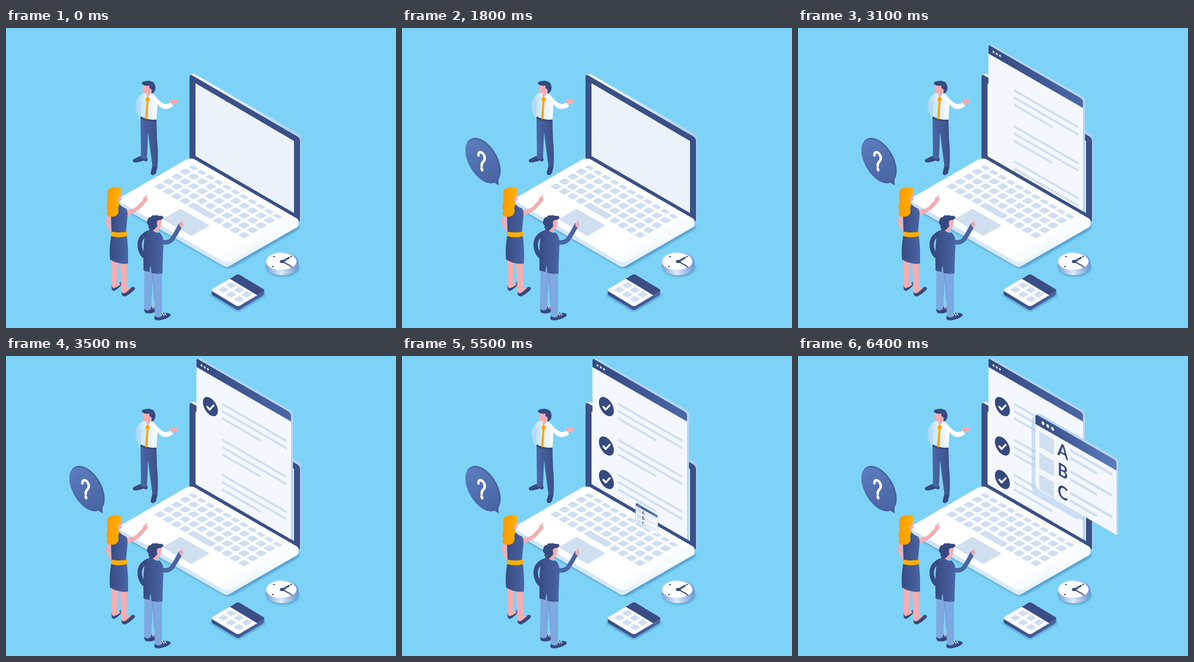
These frames come from a looping animation (780x600 px, 8 s). An HTML page:

```html
<!DOCTYPE html>
<html lang="en">
<head>
<meta charset="utf-8">
<title>Isometric presentation</title>
<style>
html, body { margin: 0; width: 100%; height: 100%; overflow: hidden; background: #7dd3f7; }
svg { display: block; width: 780px; height: 600px; }
.navy { fill: #374a80; }
.pale { fill: #d0dff0; }
.skin { fill: #f5adb2; }
.paper { fill: #f4f8fe; }
.edge { fill: #b5d5f5; }
.white { fill: #fff; }
.shade { fill: #2a6ca6; opacity: .45; filter: url(#blur); }
.line { fill: none; stroke-linecap: round; stroke-linejoin: round; }
.letter { font: 700 36px Lato, "Open Sans", sans-serif; text-anchor: middle; fill: #374a80; }
</style>
</head>
<body>
<svg viewBox="0 0 780 600">
  <defs>
    <filter id="blur" x="-20%" y="-20%" width="140%" height="140%"><feGaussianBlur stdDeviation="2"/></filter>
    <linearGradient id="bar"><stop offset="0" stop-color="#354980"/><stop offset="1" stop-color="#4b67a7"/></linearGradient>
    <linearGradient id="bar2"><stop offset="0" stop-color="#364a81"/><stop offset="1" stop-color="#5c7bbd"/></linearGradient>
    <linearGradient id="cloth"><stop offset="0" stop-color="#384b82"/><stop offset="1" stop-color="#4a65a5"/></linearGradient>
    <linearGradient id="slacks"><stop offset="0" stop-color="#4b68a8"/><stop offset="1" stop-color="#3c5189"/></linearGradient>
    <linearGradient id="shirt"><stop offset="0" stop-color="#a4d4f8"/><stop offset=".2" stop-color="#cde8fb"/><stop offset=".6" stop-color="#fff"/></linearGradient>
    <linearGradient id="hair"><stop offset="0" stop-color="#ff9800"/><stop offset="1" stop-color="#ffb300"/></linearGradient>
    <linearGradient id="side"><stop offset="0" stop-color="#cbe1f6"/><stop offset=".58" stop-color="#d9eafa"/><stop offset=".62" stop-color="#e3f0fb"/><stop offset="1" stop-color="#fff"/></linearGradient>
    <linearGradient id="deck"><stop offset=".85" stop-color="#fff"/><stop offset="1" stop-color="#f5fafd"/></linearGradient>
    <linearGradient id="lid"><stop offset="0" stop-color="#fff"/><stop offset="1" stop-color="#a9cdf0"/></linearGradient>
    <linearGradient id="rim"><stop offset="0" stop-color="#7c9fd6"/><stop offset=".45" stop-color="#dfebf9"/><stop offset="1" stop-color="#6c95d2"/></linearGradient>
    <linearGradient id="ring"><stop offset=".3" stop-color="#e6f0fb"/><stop offset="1" stop-color="#6f9ad6"/></linearGradient>
    <linearGradient id="talk" x1="0" y1="0" x2="1" y2="1"><stop offset="0" stop-color="#5f80c1"/><stop offset="1" stop-color="#46609f"/></linearGradient>
    <clipPath id="slot"><path d="M370-60H576V370L379 256L370 251Z"/></clipPath>
  </defs>
  <rect width="780" height="600" fill="#7dd3f7"/>

  <!-- laptop -->
  <path fill="url(#lid)" d="M369 96Q372 90 378 92.500L586 212Q590 214.500 590 221V384L586 388L369 262Z"/>
  <path fill="#3b5087" d="M367 99Q367 91.500 373 95L582 216.500Q588 220 588 227V384Q588 387 584 387L367 261Z"/>
  <path fill="#ebf2fa" d="M379 110.500L576 226V370L379 256Z"/>
  <g transform="matrix(.866 .5 -.866 .5 372 271)"><rect class="shade" width="255" height="171" rx="12"/></g>
  <path fill="url(#side)" d="M226 344L441 440L585 386V394Q585 396.500 581 399L447 476Q441 479.500 435 476L229 357Q226 355 226 352Z"/>
  <g transform="matrix(.866 .5 -.866 .5 369 258)">
    <rect width="255" height="171" rx="10" fill="url(#deck)"/>
    <g id="keys" class="pale"></g>
    <rect class="pale" x="92" y="115" width="67" height="42" rx="2"/>
  </g>

  <!-- page rising from the screen -->
  <g clip-path="url(#slot)">
    <g id="page">
      <path class="edge" d="M383 8Q384 3 389 5L569 108Q574 111 574 117V420L383 300Z"/>
      <path class="paper" d="M381 20L570 129V420L381 300Z"/>
      <path fill="url(#bar)" d="M381 9Q381 4 386 7.500L565 111Q570 114 570 119V131L381 22Z"/>
      <g id="pageDots" class="white"></g>
      <g id="rows" class="pale"></g>
    </g>
  </g>
  <g id="ticks"></g>

  <!-- pop-up card -->
  <g id="card">
    <path fill="#a3caef" opacity=".5" d="M467 129Q467 121 474 121L574 180V332L476 276Q467 270 467 261Z"/>
    <path class="edge" d="M477 120Q479 114 485 116.500L635 203Q641 206 641 213V354Q641 358 637 358Z"/>
    <path class="paper" d="M475 134L637 227V358L483 269Q475 264 475 256Z"/>
    <path fill="url(#bar2)" d="M475 122Q475 115 481 119.500L631 206Q637 209 637 216V229L475 136Z"/>
    <g id="cardDots" class="white"></g>
    <g id="items"></g>
  </g>

  <!-- clock -->
  <ellipse class="shade" cx="554" cy="479" rx="33" ry="18"/>
  <path fill="url(#rim)" d="M520 467V476A32.500 18.500 0 0 0 585 476V467Z"/>
  <ellipse cx="552.500" cy="467" rx="32.500" ry="18.500" fill="url(#ring)"/>
  <ellipse class="white" cx="551.500" cy="467" rx="29.500" ry="16.500"/>
  <g class="navy">
    <ellipse cx="536" cy="457" rx="2" ry="1.300"/><ellipse cx="570" cy="457" rx="2" ry="1.300"/>
    <ellipse cx="534" cy="477" rx="2" ry="1.300"/><ellipse cx="571" cy="478" rx="2" ry="1.300"/>
    <ellipse cx="552.500" cy="467" rx="5" ry="3.300"/>
  </g>
  <path class="line" stroke="#374a80" stroke-width="3.500" d="M553 467L566 459.500"/>
  <path class="line" stroke="#374a80" stroke-width="2.300" d="M553 467L569 476"/>

  <!-- calendar -->
  <g transform="matrix(.866 .52 -.866 .52 464 500)"><rect class="shade" width="66" height="66" rx="6"/></g>
  <path fill="url(#cloth)" d="M411.500 524L464 510L516.500 524V531Q516.500 533 514 534.500L467 563Q464 565 461 563L414 534.500Q411.500 533 411.500 531Z"/>
  <g transform="matrix(.866 .52 -.866 .52 464 491.500)">
    <rect class="white" width="63.500" height="63.500" rx="5"/>
    <path fill="#3a4e85" d="M0 19V5Q0 0 5 0H58.500Q63.500 0 63.500 5V19Z"/>
    <g id="days" class="pale"></g>
  </g>

  <!-- presenter -->
  <g>
    <path class="navy" d="M254 263Q264 258 271 255L282 258Q285 266 280 267L275 265Q266 269 256 269Q253 268 254 263Z"/>
    <path class="navy" d="M293 275Q298 278 303 277L300 290Q297 295 292 294Q288 292 290 287Z"/>
    <path fill="url(#slacks)" d="M269 178L270 260Q276 264 282 261L284 208L287 232L293 277Q298 280 303 277Q305 250 302 222L301 185Z"/>
    <path class="line" stroke="#374a80" stroke-width="1" opacity=".5" d="M278 184Q279 196 284 208"/>
    <path fill="url(#shirt)" d="M274 130Q265 134 259 150Q257 158 262 169L267 181L269 177Q286 186 301 184L303 152Q309 162 320 162Q330 161 334 156L330 149Q322 154 315 151Q306 146 300 138Q296 132 290 130Z"/>
    <path class="line" stroke="#9fcbee" stroke-width="1" d="M269 147Q265 153 268 175"/>
    <path fill="#34477c" d="M269 177Q286 185 301 183V187Q284 188 269 181Z"/>
    <path class="skin" d="M327 147Q330 142 335 143Q342 139 343 146Q343 152 337 152L332 153Z"/>
    <path class="skin" d="M274 114Q273 124 275 129Q279 132 282 130L281 137H286L291 131L290 114Z"/>
    <path class="white" d="M278 133L283 139L291 130L293 138L285 145L277 141Z"/>
    <path fill="#ffa500" d="M280 139L284 137L288 142L285 147L283 181Q280 184 278 181L281 147L279 143Z"/>
    <path class="navy" d="M272 112Q270 107 280 106Q290 104 296 110Q301 118 298 125Q295 131 291 131Q292 125 290 121Q286 124 287 115Q278 117 272 112Z"/>
  </g>

  <!-- woman -->
  <g>
    <path class="navy" d="M211 515Q214 520 222 515L229 508Q232 509 231 514Q224 522 216 526Q210 525 211 515Z"/>
    <path class="navy" d="M231 527Q234 531 243 525L252 518Q258 517 258 522Q250 532 238 537Q230 536 231 527Z"/>
    <path class="skin" d="M211 464L212 515Q212 521 216 520Q224 518 230 512L222 510L224 470ZM228 470L231 526Q232 533 240 529L249 521Q246 517 242 519V469Z"/>
    <path class="skin" d="M212 374Q204 374 201 380Q198 388 202 396L210 409L212 398Q207 392 209 386Z"/>
    <path class="skin" d="M241 364Q252 364 262 357Q268 350 274 344V339Q278 339 281 333L282 335L281 340Q285 342 282 346Q278 350 274 355Q264 368 243 375Z"/>
    <path class="skin" d="M224 331L230 331L231 341Q230 347 225 347V354L220 350Z"/>
    <path fill="url(#cloth)" d="M223 348Q232 359 240 361Q244 366 243 376L240 408L242 418Q245 440 244 471Q226 474 208 463Q206 440 210 418L211 408L210 376Q214 360 223 348Z"/>
    <path fill="#ffae00" d="M210 407Q226 411 242 407V416Q226 421 210 416Z"/>
    <path fill="url(#hair)" d="M205 323Q212 317 222 318Q231 318 230 324Q231 331 227 336Q222 342 225 348Q228 354 224 360Q227 368 222 374Q214 380 204 376Q199 373 203 366Q199 358 203 349Q201 343 203 336Q201 328 205 323Z"/>
  </g>

  <!-- man with raised arm -->
  <g>
    <path class="navy" d="M277 559Q275 568 280 570Q290 573 300 567Q303 562 298 559L291 555L289 560Z"/>
    <path class="navy" d="M298 574Q295 582 299 584Q313 587 329 576Q331 571 323 570L313 569L312 575Z"/>
    <path class="line" stroke="#fff" stroke-width="1.500" d="M292 556L295 561M296 555L298 560M313 570L316 575M317 570L320 574"/>
    <path fill="#7ea8e0" d="M277 482L276 561Q283 568 290 562L294 503L298 576Q305 582 312 576V488Z"/>
    <path class="line" stroke="#5f87c4" stroke-width=".8" d="M293 492Q295 510 297 545"/>
    <path class="line" stroke="#384b82" stroke-width="9" d="M283 410Q267 418 267.500 434Q268 448 276 456"/>
    <path class="line" stroke="#4a65a5" stroke-width="9" stroke-linecap="butt" d="M308 428Q325 431 332 423Q340 411 348.500 395"/>
    <path class="skin" d="M346 394L350 388L353 382V388Q357 391 354 396L350 399Z"/>
    <path class="skin" d="M300 382H311Q312 394 307 402Q304 407 300 406L296 411L291 404Z"/>
    <path fill="url(#cloth)" d="M289 402Q283 405 279 411Q274 420 275 485L287 488L289 474L291 490Q303 493 313 491Q313 465 315 433Q316 416 307 409Q300 411 294 405Z"/>
    <path class="navy" d="M283 384Q284 378 290 378Q292 373 298 375Q303 373 306 376Q313 374 315 379Q314 384 306 384Q300 386 302 392Q304 397 299 400Q296 406 290 404Q284 402 285 395Q280 390 283 384Z"/>
  </g>

  <!-- speech bubble -->
  <g id="bubble">
    <path fill="#46609f" d="M182 306Q188 313 194 314Q192 309 193.500 300Z"/>
    <circle r="40.700" fill="#46609f" transform="matrix(.866 .5 0 1 162.200 265.200)"/>
    <circle r="38.500" fill="url(#talk)" transform="matrix(.866 .5 0 1 160.500 265)"/>
    <path class="line" stroke="#fff" stroke-width="5" stroke-linecap="butt" d="M153 255C151.500 243 165.500 249 165.500 260C165.500 269 158.500 266 159.500 276"/>
    <circle class="white" r="3.400" transform="matrix(.866 .5 0 1.250 159.800 282.500)"/>
  </g>
</svg>
<script>
const $ = id => document.getElementById(id);
const fill = (id, parts) => { $(id).innerHTML = parts.join(""); };
const range = n => [...Array(n).keys()];
const SLOPE = .577;

const tile = (cx, cy, w, h, r) =>
  `<rect x="${cx - w / 2}" y="${cy - h / 2}" width="${w}" height="${h}" rx="${r}"/>`;
// upright strip on the slanted plane, y is its upper left corner
const strip = (x, y, w, h) =>
  `<path d="M${x} ${y}l${w} ${w * SLOPE}v${h}l${-w} ${-w * SLOPE}z"/>`;
const dots = (x, y, step, r) => range(3).map(i =>
  `<circle r="${r}" transform="matrix(.866 .5 0 1 ${x + i * step} ${y + i * step * SLOPE})"/>`);

const keys = [];
for (const i of range(11)) {
  const u = 23.8 + i * 19.4;
  keys.push(tile(u + 1, 18, 14, 9, 2));
  for (const r of range(4)) {
    if (r < 3 || i < 4 || i > 6) keys.push(tile(u, 35.4 + r * 19.6, 14, 14, 3));
  }
}
keys.push(tile(120.8, 94.2, 53, 14, 3));
fill("keys", keys);

fill("days", range(6).map(i => tile(14 + i % 3 * 17.9, 30 + (i > 2) * 17.7, 12.5, 12.5, 1)));
fill("pageDots", dots(391, 19, 6.5, 2.1));
fill("cardDots", dots(490, 134.5, 9.6, 3.4));

fill("rows", [93, 165, 235].flatMap(y =>
  [[0, 129], [14.5, 129], [29, 77]].map(([dy, w]) => strip(432, y + dy, w, 5))));

fill("ticks", [101.2, 180, 247].map(y => `<g transform="translate(408.800 ${y})">
  <circle class="navy" r="17.300" transform="matrix(.866 .5 0 1 0 0)"/>
  <path class="line" stroke="#fff" stroke-width="3.800" d="M-6 .5L-1.500 6L6.500-2.500"/></g>`));

fill("items", ["A", "B", "C"].map((c, i) => {
  const y = i * 42.7;
  return `<g class="pale">${strip(482.5, 150.5 + y, 29.5, 31)}
    ${strip(544, 185 + y, 85, 6)}${strip(544, 200.5 + y, 54, 6)}</g>
    <text class="letter" transform="matrix(.866 .5 0 1 529.500 ${[203, 243, 286][i]})">${c}</text>`;
}));

const ticks = [...$("ticks").children];
const show = (el, on) => el.setAttribute("visibility", on ? "visible" : "hidden");
const scaleAt = (el, x, y, s) =>
  el.setAttribute("transform", `translate(${x} ${y}) scale(${s}) translate(${-x} ${-y})`);
// slowing growth that ends a little too large
const grow = (from, to, u) => from + (to - from) * (1.41 * u - .41 * u * u);

const LOOP = 8000, STEP = 100;

function draw(ms) {
  const n = Math.floor(ms % LOOP / STEP);

  show($("bubble"), n >= 10);
  scaleAt($("bubble"), 196, 314, n < 18 ? grow(.2, 1.07, Math.max(0, n - 10) / 7) : 1);

  const lift = n <= 32 ? 29 * (32 - Math.max(n, 24)) : n === 33 ? -5 : n === 34 ? -2.5 : 0;
  show($("page"), n >= 24);
  $("page").setAttribute("transform", `translate(0 ${lift})`);
  ticks.forEach((el, i) => show(el, n >= 35 + i * 5));

  show($("card"), n >= 55);
  scaleAt($("card"), 465.4, 358, n < 64 ? grow(.265, 1.045, Math.max(0, n - 55) / 8) : 1);
}

const start = performance.now();
function tick() {
  draw(performance.now() - start);
  requestAnimationFrame(tick);
}
tick();
</script>
</body>
</html>
```
